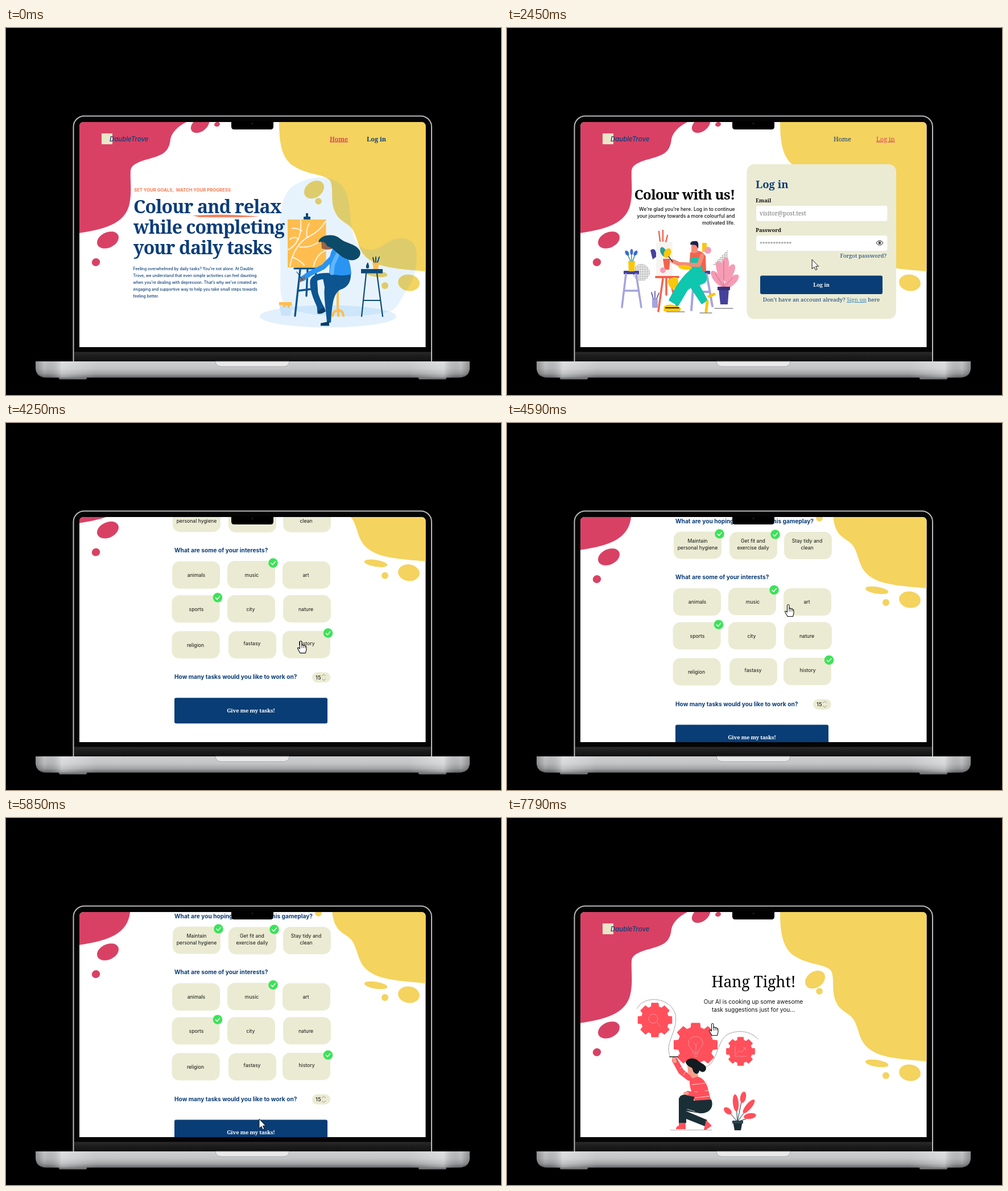
These frames come from a looping animation (870 by 644 pixels, 8 s). An HTML page:

```html
<!DOCTYPE html>
<html lang="en">
<head>
<meta charset="utf-8">
<title>Painting site on a laptop</title>
<style>
  html, body { margin: 0; width: 100%; height: 100%; overflow: hidden; background: #000; }
  svg { display: block; width: 870px; height: 644px; }
  .sans { font-family: Inter, "Open Sans", sans-serif; }
  .serif { font-family: "Noto Serif", "Liberation Serif", serif; }
</style>
</head>
<body>
<svg id="stage" viewBox="0 0 870 644"></svg>
<script>
const NAVY = '#0b3d78', PINK = '#d94164', YELLOW = '#f4d35e', CREAM = '#ebebd3', RED = '#ff505b', INK = '#1a2e35';

// Drawing helpers
const shape = (d, fill, more = '') => `<path d="${d}" fill="${fill}" ${more}/>`;
const line = (d, color, w = 1, more = '') =>
  `<path d="${d}" fill="none" stroke="${color}" stroke-width="${w}" stroke-linecap="round" stroke-linejoin="round" ${more}/>`;
const rect = (x, y, w, h, fill, r = 0, more = '') =>
  `<rect x="${x}" y="${y}" width="${w}" height="${h}" rx="${r}" fill="${fill}" ${more}/>`;
const oval = (x, y, rx, ry, fill, turn = 0) =>
  `<ellipse cx="${x}" cy="${y}" rx="${rx}" ry="${ry}" fill="${fill}" transform="rotate(${turn} ${x} ${y})"/>`;
const text = (x, y, size, str, { font = 'sans', fill = '#111', weight = 400, anchor = 'start', gap = 0, more = '' } = {}) =>
  `<text x="${x}" y="${y}" class="${font}" font-size="${size}" fill="${fill}" font-weight="${weight}" text-anchor="${anchor}" letter-spacing="${gap}" ${more}>${str}</text>`;
const serif = (x, y, size, str, o = {}) => text(x, y, size, str, { font: 'serif', fill: NAVY, weight: 700, ...o });
const scene = (id, ...parts) => `<g id="${id}">${parts.join('')}</g>`;

const blobs =
  shape('M128 165H317C302 173 292 182 289 195C287 214 279 220 266 225C246 232 221 235 219 250C218 266 221 283 218 303C213 340 182 352 128 360Z', PINK) +
  oval(179, 372, 20, 13.5, PINK, -25) + oval(158, 411, 7.3, 6.8, PINK, -20) +
  oval(341, 170, 18, 11.5, PINK, -35) + oval(371, 169, 5, 4, PINK, -20) +
  shape('M480 165H738V427C700 424 668 421 650 413C617 398 622 377 610 355C602 341 586 341 578 322C569 300 577 281 569 267C556 255 530 259 502 240C485 226 480 203 480 165Z', YELLOW) +
  oval(541.5, 283.5, 19, 14, YELLOW, -35) + oval(549, 304, 5.8, 5.8, YELLOW) +
  oval(650, 430.5, 20.5, 6, YELLOW, 9) + oval(666, 452, 6, 6, YELLOW) + oval(708, 447, 19, 14.5, YELLOW, 8);

const logo = rect(168, 185, 19, 19, '#ece6c8') +
  text(182, 199, 11.4, 'DaubleTrove', { fill: NAVY, weight: 500, more: 'font-style="italic"' });

function homeArt() {
  const leaf = '#fff3dc', teal = '#0b4a78', hair = '#0b4a68', pants = '#0c5591';
  return [
    oval(566, 506, 120, 19.5, '#e2f0fd'),
    shape('M482 400C480 345 479 302 500 281C522 262 566 254 588 274C611 296 600 340 613 370C622 392 645 394 664 381C686 363 716 365 721 389C724 414 719 440 703 462C692 478 690 490 676 497C620 512 520 508 492 488C477 470 484 440 482 400Z', '#248de2', 'opacity=".105"'),
    shape('M480 485H504L500 505H484Z', '#c9e3fa'),
    shape('M480 481H502V487H498V491H495V487H491V490H487V486H480Z', '#ffbd4f'),
    rect(527, 325, 4, 8, teal), rect(523, 331, 12, 5, teal, 1),
    rect(495, 336, 67.5, 84, '#ffbd4f'),
    line('M496 389Q521 376 518 337M520 356Q509 350 503 352M514 371Q506 364 499 371', leaf, 2),
    line('M499 418Q507 378 534 365Q552 356 562 339M516 384Q534 387 552 374M529 368Q527 352 533 343M503 402Q516 407 524 416M540 420Q545 397 562 390', leaf, 2),
    line('M507 422H551', teal, 3.2),
    line('M517 424L508 505M530 424L528 470M544 424L549 500M514 461L545 457', pants, 3.4),
    line('M583 434V498M574 505Q576 495 584 495Q592 495 593 505M584 497V505M574 440H602', '#ffbd4f', 4),
    shape('M606 430C607 446 600 455 588 459C574 466 573 490 571 517L564 517C562 490 558 470 560 455L556 434Z', pants),
    line('M592 438Q545 430 540 444Q538 461 555 494', pants, 11),
    shape('M548 497L559 490L562 497Q554 503 549 501M553 518L568 515V522.5H553Z', '#0b3c63'),
    shape('M574 388C595 382 606 406 607 432Q588 437 568 431C570 416 566 400 574 388Z', '#2a94f2'),
    line('M580 396L558 419L534 431L521 440', '#2a94f2', 9),
    line('M583 397L575 414Q573 424 573 430', '#60b6ff', 7),
    line('M524 438L517 444', '#9c6345', 4), line('M521 442L511 428', teal, 1.2),
    shape('M554 374L568 370L573 388L563 389L555 387Z', '#9c6345'),
    shape('M549 376C551 363 574 360 585 368C599 380 614 377 622 391C626 403 612 411 601 406C586 402 578 388 568 384C562 385 565 372 549 376Z', hair),
    rect(624, 423, 38, 7.5, teal),
    line('M633 431L625 506M652 431L662 506M629 478H658', teal, 2.2),
    shape('M636 411C638 416 640 422 635 422C631 421 633 415 636 411Z', teal),
    shape('M644 411H656L654 423H646Z', '#ffbd4f'),
    line('M647 411L645 403M650 411L650 402M653 411L656 402', teal, 2)
  ].join('');
}

const bodyLines = [
  'Feeling overwhelmed by daily tasks? You’re not alone. At Dauble',
  'Trove, we understand that even simple activities can feel daunting',
  'when you’re dealing with depression. That’s why we’ve created an',
  'engaging and supportive way to help you take small steps towards',
  'feeling better.'
];
const underline = 'text-decoration="underline"';
const home = scene('home', logo, homeArt(),
  serif(569, 198.5, 10.8, 'Home', { fill: PINK, weight: 600, more: underline }),
  serif(634, 198.5, 11, 'Log in', { weight: 600 }),
  text(225, 287, 7.75, 'SET YOUR GOALS, &#160;WATCH YOUR PROGRESS', { fill: '#f47b50', weight: 700 }),
  shape('M328 329Q385 325 446 331Q400 333 340 332Z', '#f5805f'),
  ['Colour and relax', 'while completing', 'your daily tasks'].map((s, i) => serif(224, 324.5 + 36 * i, 32, s, { gap: -.9 })).join(''),
  bodyLines.map((s, i) => text(223.5, 425 + 12.05 * i, 6.88, s, { fill: NAVY, weight: 500 })).join(''));

function loginArt() {
  const lilac = '#a5a4de', violet = '#45419b', coral = '#f4624d', teal = '#0fc6ae', skin = '#f58a78', pink = '#f59cb5';
  const leaves = [[370, 440, -38], [376, 426, -20], [383, 419, 8], [391, 430, 28], [394, 445, 48]];
  return [
    `<pattern id="dots" width="3" height="3" patternUnits="userSpaceOnUse"><circle cx="1" cy="1" r=".8" fill="#333"/></pattern>`,
    oval(236, 429, 15, 15, 'url(#dots)'), shape('M362 416L388 389V416Z', 'url(#dots)'),
    rect(205, 426, 27, 6, violet, 1), line('M209 432L202 490M227 432L236 490M206 461H232', lilac, 3.5),
    shape('M213 409H225L224 427H214Z', '#f9c80e'),
    line('M217 409L211 395M219 409L219 391M221 409L226 394', '#218a83', 1.3),
    oval(211, 395, 3, 5, '#3a6cc9', -30), oval(219, 393, 2.5, 5, '#3a6cc9'), oval(226, 395, 3, 5, '#3a6cc9', 30),
    line('M267 357L269 374M274 355L274 374M282 364L279 376', coral, 2.4),
    shape('M252 390Q262 383 263 401L256 406Z', violet),
    rect(262, 376, 29, 58, '#f6f4f0'), shape('M274 405H287L285 424H277Z', coral),
    oval(275, 393, 5, 9, '#2c9c93', -25), oval(282, 395, 6, 9, '#f9c80e', 25), oval(274, 425, 5, 5, pink),
    line('M262 437H301', coral, 4), line('M274 440L266 497M286 440L300 495M280 440V468', coral, 3.5),
    shape('M283 442Q302 431 301 447Q300 456 291 459Q282 452 283 442Z', '#f9c80e'),
    rect(255, 475, 10, 16, lilac, 2), line('M257 475L254 464M260 475V462M263 475L267 465', violet, 1.5),
    rect(324, 426, 33, 6, violet, 1), line('M329 432L324 495M351 432L361 488M328 463H356', lilac, 4),
    rect(343, 377, 8, 16, '#f9c80e'), oval(353, 390, 6, 6, pink),
    shape('M324 423C340 416 356 431 350 445C344 453 326 451 317 461L301 488L284 478C292 463 303 439 324 423Z', teal),
    shape('M333 441L353 478L342 485L318 449Z', teal),
    line('M352 480L350 497M355 471L364 467', '#f9c80e', 5),
    shape('M276 488Q288 481 306 492L304 497H275Z', '#f9c80e'), line('M279 491H302', '#222', 2),
    shape('M322 394Q340 386 349 400L350 427Q336 430 320 424Z', coral),
    shape('M323 402H340L344 427H321Z', teal),
    line('M343 399L337 416L302 414L291 409', skin, 7), line('M291 410L284 401', '#222', 1.3),
    oval(313, 420, 12, 4, '#f9c80e', 6),
    rect(324, 377, 11, 18, skin, 4), shape('M322 380Q322 373 330 374Q338 372 336 387L332 381Z', '#20204d'),
    line('M365 492H397M280 498H312M339 500H360', '#222', .8),
    leaves.map(([x, y, a]) => oval(x, y, 7, 17, pink, a)).join(''),
    line('M381 458V409M381 455L366 431M381 455L397 438', '#c95b82', .8),
    shape('M372 457H390L388 485H375Z', violet), rect(370, 454, 22, 6, '#37337f')
  ].join('');
}

const rightLines = ['We’re glad you’re here. Log in to continue', 'your journey towards a more colourful and', 'motivated life.'];
const field = y => rect(437.5, y, 231.5, 28, '#fff', 4, 'stroke="#e2e2d6" stroke-width=".8"');
const login = scene('login', logo,
  serif(574, 198.5, 10.8, 'Home', { weight: 500 }),
  serif(649, 198.5, 11, 'Log in', { fill: PINK, weight: 500, more: underline }),
  serif(400.5, 301, 24, 'Colour with us!', { fill: '#000', anchor: 'end', gap: -.65 }),
  rightLines.map((s, i) => text(400.5, 320.5 + 12 * i, 8.5, s, { weight: 500, anchor: 'end' })).join(''),
  loginArt(),
  rect(421.5, 239, 262.5, 271.5, CREAM, 13),
  serif(437, 281, 18.6, 'Log in'),
  serif(437, 306, 9.3, 'Email', { fill: '#111', weight: 600 }), field(311.3),
  serif(444, 328.5, 10.3, 'visitor@post.test', { fill: '#777', weight: 400 }),
  serif(437, 357.5, 9.3, 'Password', { fill: '#111', weight: 600 }), field(363.6),
  serif(444, 381.5, 9.4, '************', { fill: '#777', weight: 400 }),
  line('M649 377Q655 369 661 377Q655 385 649 377Z', '#444', 1.2), oval(655, 377, 2.4, 2.4, '#444'),
  serif(667, 403, 9.7, 'Forgot password?', { weight: 500, anchor: 'end' }),
  rect(445, 434.6, 215, 32.5, '#093d75', 3),
  serif(552.5, 454, 9.2, 'Log in', { fill: '#fff', anchor: 'middle' }),
  serif(552.5, 480, 9.7, `Don’t have an account already? <tspan fill="#2f86c9" ${underline}>Sign up</tspan> here`, { weight: 500, anchor: 'middle' }));

const label = (x, y, s) => text(x, y + 3, 8.7, s, { anchor: 'middle' });
const tile = (x, y, cx, cy, ...rows) => rect(x, y, 84, 48, CREAM, 13) +
  rows.map((s, i) => label(cx, cy + (i - (rows.length - 1) / 2) * 12, s)).join('');
const tick = (x, y) => oval(x, y, 8.3, 8.3, '#3be357') + line(`M${x - 3.6} ${y + .2}l2.6 2.9l4.8-5.6`, '#fff', 1.5);
const question = (y, s) => text(296, y, 10.2, s, { fill: NAVY, weight: 700 });
const survey = scene('survey', '<g transform="translate(0 137)">',
  question(175.7, 'What are you hoping to get out of this gameplay?'),
  tile(293, 190.5, 335, 213, 'Maintain', 'personal hygiene'),
  tile(391, 191.3, 432.5, 213, 'Get fit and', 'exercise daily'),
  tile(487, 191, 527.5, 213, 'Stay tidy and', 'clean'),
  question(274.3, 'What are some of your interests?'),
  tile(292, 290, 334.5, 314, 'animals'), tile(389, 289.3, 432, 314, 'music'), tile(486, 290, 527, 314, 'art'),
  tile(291.5, 349.6, 334.5, 374, 'sports'), tile(389, 349.3, 430, 374, 'city'), tile(487, 349.3, 527, 374, 'nature'),
  tile(291.5, 412.6, 333, 437, 'religion'), tile(391, 412.6, 432.5, 434, 'fastasy'), tile(486, 412, 528.5, 434, 'history'),
  tick(373.5, 194.5), tick(471.5, 195.5), tick(469.5, 293), tick(372, 353.7), tick(566, 416),
  question(496.8, 'How many tasks would you like to work on?'),
  rect(538, 484.7, 32, 18, CREAM, 9), text(544, 497.3, 9.6, '15'),
  line('M555.5 491l3-2.6l3 2.6M555.5 496.5l3 2.6l3-2.6', '#888', .9),
  rect(296, 529.6, 269, 45, '#093d75', 3),
  serif(430.5, 555, 9.6, 'Give me my tasks!', { fill: '#fff', anchor: 'middle', gap: -.2 }), '</g>');

// Eight square-ish teeth around a disc
function gear(cx, cy, r) {
  const pts = [];
  for (let i = 0; i < 8; i++)
    for (const [a, k] of [[-.27, .8], [-.19, 1], [.19, 1], [.27, .8]]) {
      const angle = i * Math.PI / 4 + a;
      pts.push((cx + r * k * Math.cos(angle)).toFixed(1) + ' ' + (cy + r * k * Math.sin(angle)).toFixed(1));
    }
  return shape('M' + pts.join('L') + 'Z', RED, `stroke="${RED}" stroke-width="1.5" stroke-linejoin="round"`);
}

function waitArt() {
  const skin = '#f3a08c', thin = '#e8929a';
  const leaves = [[388, 514, -50, 8], [402, 500, -5, 15], [415, 490, 12, 10], [425, 506, 40, 15], [427, 523, 80, 11]];
  return [
    line('M229 334C240 311 287 313 296 345C301 376 276 392 287 420M347 437C371 433 367 391 389 379C410 370 431 376 441 388', '#555', .8, 'stroke-dasharray="1 1.6"'),
    gear(260, 354.5, 30), gear(331.5, 398, 38.5), gear(410.5, 409.5, 25),
    line('M257 344a8 8 0 1 0 .1 0M264 359l6 7', thin, 1),
    line('M327 411C327 404 319 404 319 395C319 380 344 380 344 395C344 404 336 404 336 411ZM328 414H336M329 418H335M332 410V398L328 394M332 398L336 394', thin, 1),
    line('M401 401V418H420M403 414L408 408L412 411L419 403M415 403H419V407', thin, 1),
    line('M287 547.5H360', '#999', .8),
    line('M320 456L306 445L295 425', RED, 10), line('M295 427L293 422', skin, 6), line('M286 419H300', '#222', 1.5),
    shape('M322 456C335 448 349 458 353 474L359 498L331 499C327 486 318 470 322 456Z', RED),
    line('M304 440L310 434M310 451L315 444M325 468L351 465M329 481L355 478M330 491L357 488', '#ffd2d0', 1),
    shape('M328 496L359 494C365 508 354 520 338 518L314 514L352 530L348 541L315 528V535H302V493C304 483 318 484 330 487Z', INK),
    line('M317 511L330 515', '#fff', .8),
    line('M348 473L335 486L318 483', RED, 8), oval(315, 483, 5, 3, skin),
    shape('M302 535H314V546H297Q297 541 302 540Z', RED), shape('M350 530L360 540L350 547H346Z', RED),
    shape('M317 432Q329 426 334 436L336 453L326 457L318 447Z', skin),
    shape('M314 429C316 420 331 420 337 427C344 432 350 433 350 440C348 447 343 447 338 443C337 451 330 450 327 444C326 434 319 440 314 429Z', '#111b20'),
    line('M405 533L389 514M405 533L402 490M405 533L415 483M405 533L427 503M405 533L435 523', INK, 1),
    leaves.map(([x, y, a, l]) => oval(x, y, 5, l, RED, a)).join(''),
    shape('M397 532H414L411 548H400Z', INK), rect(396, 531, 19, 5, '#2d4650')
  ].join('');
}

const wait = scene('wait', logo, waitArt(),
  serif(433.5, 296.5, 26.5, 'Hang Tight!', { fill: '#000', weight: 500, anchor: 'middle' }),
  ['Our AI is cooking up some awesome', 'task suggestions just for you...'].map((s, i) =>
    text(433, 325.5 + 14.5 * i, 10.15, s, { anchor: 'middle' })).join(''));

const baseShape = 'M52 585H815V597Q814 613 796 613.5H71Q53 613 52 597Z';
const laptopBack = rect(118.5, 154.5, 629.5, 450, '#050505', 19, 'stroke="#b9babc" stroke-width="2"');
const laptopFront =
  shape('M396 164H470V173Q470 178 465 178H401Q396 178 396 173Z', '#000') + oval(433, 167.5, 2, 2, '#15151c') +
  rect(120, 560, 627, 9, '#050505') + rect(120, 568.5, 627, 17, 'url(#chin)') +
  rect(93, 611, 49, 5.5, '#77787a', 2) + rect(725, 611, 49, 5.5, '#77787a', 2) +
  shape(baseShape, 'url(#base)') + shape(baseShape, 'url(#shade)') +
  shape('M368 585H498Q497 594 488 594H378Q369 594 368 585Z', '#e9e9ea', 'stroke="#999" stroke-width=".7"');

const gradient = (id, axis, ...stops) => `<linearGradient id="${id}" ${axis}>` +
  stops.map(([o, c, a = 1]) => `<stop offset="${o}" stop-color="${c}" stop-opacity="${a}"/>`).join('') + '</linearGradient>';
const down = 'x2="0" y2="1"';

document.getElementById('stage').innerHTML = `<defs>
  <clipPath id="screen"><path d="M129 560V173Q129 165 137 165H729.5Q737.5 165 737.5 173V560Z"/></clipPath>
  ${gradient('chin', down, [0, '#2b2b2b'], [.4, '#1d1d1d'], [1, '#111'])}
  ${gradient('base', down, [0, '#cfd0d2'], [.45, '#c2c3c5'], [.75, '#a3a4a6'], [1, '#66676a'])}
  ${gradient('shade', '', [0, '#000', .3], [.02, '#000', .05], [.06, '#fff', .35], [.14, '#fff', 0], [.86, '#fff', 0], [.94, '#fff', .35], [.98, '#000', .05], [1, '#000', .3])}
  </defs>${laptopBack}
  <g clip-path="url(#screen)">${rect(128, 165, 611, 396, '#fff')}<g id="page">${blobs}${home}${login}${survey}${wait}</g></g>
  ${laptopFront}
  <g id="cursor">
    <circle id="click" r="11.7" fill="#f7e600" opacity=".75"/>
    <g id="arrow">${shape('M0 0V16.5L3.8 13L6.3 18.5L9 17.3L6.5 12H11.5Z', '#fff', 'stroke="#111" stroke-width="1" stroke-linejoin="round"')}</g>
    <g id="hand" transform="translate(0 1.5)">${shape('M-1.5 2Q-1.5 0 .2 0Q2 0 2 2V8Q2 6 4 6.5Q5 7 5 8Q6 6.7 7.5 7.5Q8 8 8 9Q10 8.2 10 11V15Q9.5 18 8.5 21H-1C-2 18-5 15-5.5 12.5Q-4.5 10.5-1.5 13.5Z', '#fff', 'stroke="#111" stroke-width="1.1" stroke-linejoin="round"')}
      ${line('M2 8V12M5 8.5V12M8 9.5V12', '#111', .8)}</g>
  </g>`;

// Smooth path through [time, ...values]; a repeated value makes a rest
function follow(keys, t) {
  const last = keys.length - 1;
  if (t <= keys[0][0]) return keys[0].slice(1);
  if (t >= keys[last][0]) return keys[last].slice(1);
  const i = keys.findIndex(k => k[0] > t) - 1;
  const a = keys[i], b = keys[i + 1], span = b[0] - a[0], u = (t - a[0]) / span;
  const same = (p, q) => p.slice(1).every((v, n) => v === q[n + 1]);
  const slope = (n, c) => {
    const p = keys[n - 1], q = keys[n + 1];
    if (!p || !q || same(p, keys[n]) || same(q, keys[n])) return 0;
    return (q[c] - p[c]) / (q[0] - p[0]) * span;
  };
  return a.slice(1).map((v, n) => {
    const c = n + 1, m0 = slope(i, c), m1 = slope(i + 1, c), d = b[c] - v;
    return v + m0 * u + (3 * d - 2 * m0 - m1) * u * u + (m0 + m1 - 2 * d) * u * u * u;
  });
}

const PATH = [
  [660, 853, 214], [860, 785, 188], [1080, 695, 173], [1260, 655, 192], [1920, 655, 192],
  [2130, 590, 262], [2300, 499, 365], [2450, 536, 406], [2720, 541, 443], [3920, 541, 443],
  [4590, 494, 317], [4860, 494, 317], [5400, 470, 430], [5850, 445, 528], [6060, 458, 540], [6200, 460, 540],
  [6520, 570, 520], [6780, 580, 410], [7000, 515, 310], [7180, 450, 272], [7320, 411, 289],
  [7450, 411, 289], [7790, 361, 359]
];
const SCROLL = [[3920, 230], [4590, 137], [4860, 137], [5220, 44], [5650, 137]];
const SCENES = [['home', 0], ['login', 1650], ['survey', 3120], ['wait', 6200]];
const HANDS = [[1130, 1990], [2640, 4930], [5940, 6200], [7720, 8000]];
const CLICKS = [[1520, 1650], [2980, 3120], [6100, 6200]];

const el = id => document.getElementById(id);
const show = (id, on) => el(id).setAttribute('visibility', on ? 'visible' : 'hidden');
const within = (spans, t) => spans.some(([a, b]) => t >= a && t < b);

function draw(now) {
  const t = now % 8000;
  const current = SCENES.filter(s => t >= s[1]).pop()[0];
  SCENES.forEach(([id]) => show(id, id === current));
  const offset = current === 'survey' ? follow(SCROLL, t)[0] : 0;
  el('page').setAttribute('transform', `translate(0 ${-offset})`);
  const visible = t >= 660, hand = within(HANDS, t);
  el('cursor').setAttribute('transform', `translate(${follow(PATH, t).join(' ')})`);
  show('arrow', visible && !hand);
  show('hand', visible && hand);
  show('click', visible && within(CLICKS, t));
}

const start = performance.now();
function loop() {
  draw(performance.now() - start);
  requestAnimationFrame(loop);
}
loop();
</script>
</body>
</html>
```
